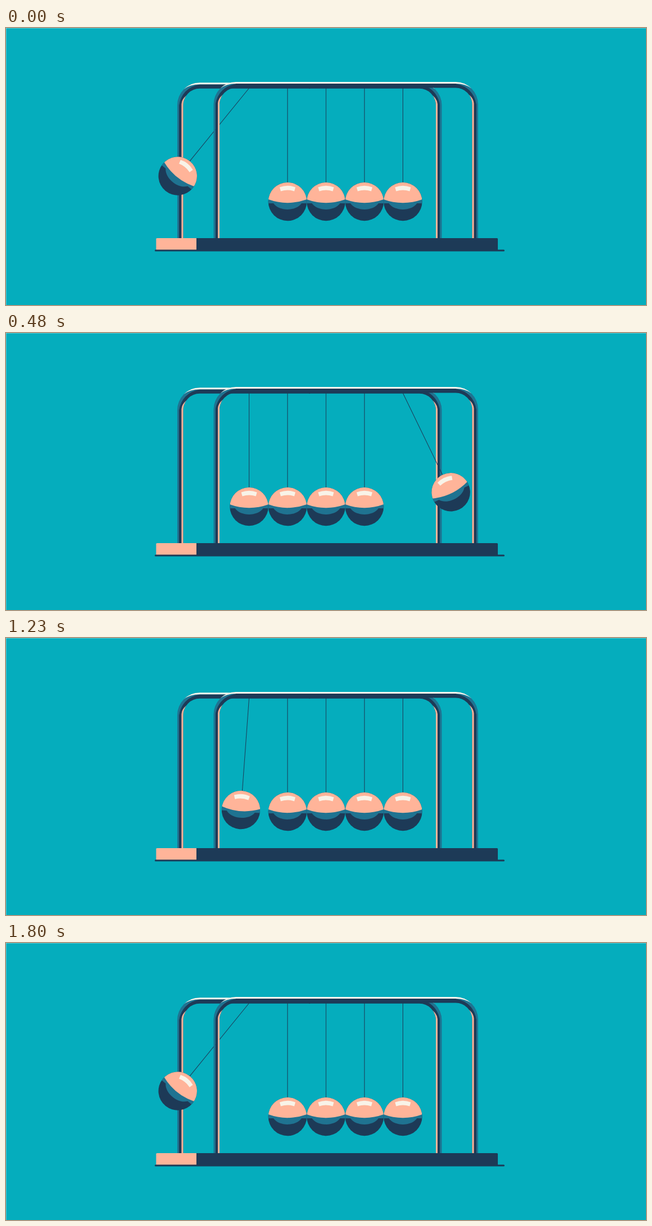
These frames come from a looping animation (1136x493 px, 1.83 s). An HTML page:

```html
<!DOCTYPE html>
<html lang="en">
<head>
<meta charset="utf-8">
<title>Swinging balls</title>
<style>
  html, body { margin: 0; width: 100%; height: 100%; overflow: hidden; background: #05adbd; }
  svg { display: block; width: 100%; height: 100%; }
</style>
</head>
<body>
<svg viewBox="0 0 1136 493">
  <defs>
    <clipPath id="disc"><circle r="34.2"/></clipPath>
    <g id="ball">
      <circle r="34.2" fill="#1d3a57"/>
      <g clip-path="url(#disc)">
        <path d="M-35-6H35V3H25C15 17.5-15 17.5-25 3H-35Z" fill="#1f7391"/>
        <path d="M-35-35H35V-4.3Q0 8.6-35-4.3Z" fill="#ffb499"/>
      </g>
      <path d="M-14-25.5Q0-31 14-25.5L12-18.5Q0-22.5-12-18.5Z" fill="#f8f3e8"/>
    </g>
    <!-- left half of one bent tube; its outer corner sits at 0,0 -->
    <g id="half">
      <path d="M6.75 280V40A33.25 33.25 0 0 1 40 6.75H236" fill="none" stroke="#1d3a57" stroke-width="7.5"/>
      <path d="M0 280V40A40 40 0 0 1 40 0V3Q9 9 3 40V280Z" fill="#1f7391"/>
      <path d="M7.5 280V38Q8 30 15.8 23Q10.5 31 10.5 40V280Z" fill="#ffb499"/>
      <path d="M11.7 11.7A40 40 0 0 1 40 0H236V3H40Q22 3 11.7 11.7Z" fill="#fbf8ee"/>
    </g>
    <g id="tube">
      <use href="#half"/>
      <use href="#half" transform="matrix(-1 0 0 1 469.5 0)"/>
    </g>
  </defs>
  <rect width="1136" height="493" fill="#05adbd"/>
  <path d="M0 .5H1136M.5 0V493" stroke="#fff" stroke-opacity=".3"/>
  <use href="#tube" x="304" y="97.3"/>
  <g id="balls"></g>
  <use href="#tube" x="368.5" y="96"/>
  <path d="M268 374H338V396H266.5V375.5Q266.5 374 268 374Z" fill="#ffb499"/>
  <path d="M338 374H871.5Q873 374 873 375.5V396H338Z" fill="#1d3a57"/>
  <rect x="264" y="394.5" width="621" height="3" rx="1.5" fill="#1d3a57"/>
</svg>
<script>
const NS = 'http://www.w3.org/2000/svg';
const LOOP = 1830, STEP = 30;
const PIVOT_X = 431.5, PIVOT_Y = 107, GAP = 68.25, LENGTH = 202, REACH = 130.4;

// Swing keys: time, side offset (-1 left, 1 right), speed per second
const keys = [
  [0, -.972, 1.2], [180, -.334, 3.9], [275, 0, 3.4], [480, .653, 3.2],
  [540, .832, 2.6], [690, 1, 0], [810, .98, -.5], [1050, .498, -3.2],
  [1080, .398, -3.4], [1198, 0, -3.5], [1410, -.71, -3.1], [1620, -1, 0],
  [1800, -.972, .2], [LOOP, -.972, 0]
];

function make(parent, tag, attrs) {
  const el = document.createElementNS(NS, tag);
  for (const k in attrs) el.setAttribute(k, attrs[k]);
  return parent.appendChild(el);
}

const balls = Array.from({ length: 5 }, (_, i) => {
  const g = make(document.getElementById('balls'), 'g', {});
  const string = make(g, 'line', { stroke: '#1d3a57', 'stroke-width': 1 });
  const body = make(g, 'use', { href: '#ball' });
  return { g, string, body, x: PIVOT_X + i * GAP };
});

function swing(t) {
  if (t >= 1800) return keys[12][1];
  const i = keys.findIndex(k => k[0] > t);
  const [t0, p0, v0] = keys[i - 1], [t1, p1, v1] = keys[i];
  const d = t1 - t0, s = (t - t0) / d, r = 1 - s;
  return r * r * ((1 + 2 * s) * p0 + s * v0 * d / 1000)
       + s * s * ((3 - 2 * s) * p1 - r * v1 * d / 1000);
}

function pose(ball, u) {
  // the path is a little flatter than a circle
  const len = LENGTH - 7 * Math.sin(Math.PI * Math.abs(u));
  const angle = -Math.asin(REACH * u / len) * 180 / Math.PI;
  ball.g.setAttribute('transform', `translate(${ball.x} ${PIVOT_Y}) rotate(${angle})`);
  ball.string.setAttribute('y2', len - 30);
  ball.body.setAttribute('y', len);
}

function draw(ms) {
  const t = Math.floor(((ms + 2) % LOOP) / STEP) * STEP;
  const u = swing(t);
  balls.forEach((ball, i) =>
    pose(ball, i === 0 ? Math.min(u, 0) : i === 4 ? Math.max(u, 0) : 0));
}

const start = performance.now();
function tick() {
  draw(performance.now() - start);
  requestAnimationFrame(tick);
}
tick();
</script>
</body>
</html>
```
